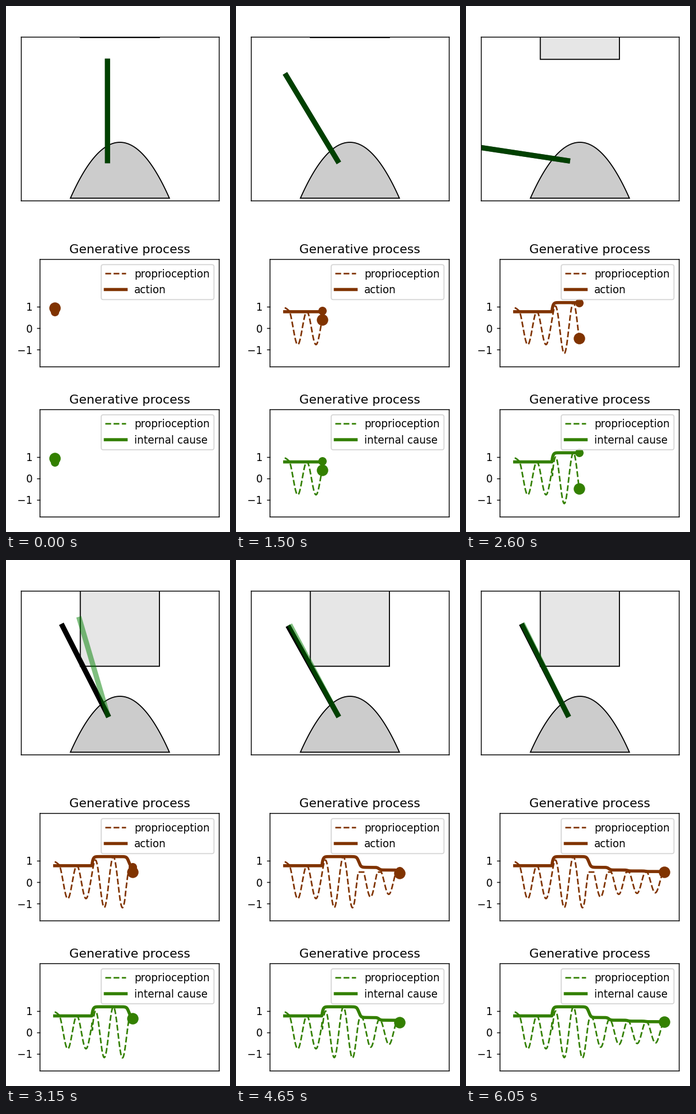
A matplotlib script for the animation above (6100 ms loop, 400x934 px).

```python
import matplotlib.pyplot as plt
import numpy as np
from matplotlib.animation import FuncAnimation
from matplotlib.patches import Polygon, Rectangle

W, H, DPI = 400, 934, 100
FRAMES, INTERVAL = 122, 50
SCALE = 4 / 3

plt.rcParams["font.family"] = "DejaVu Sans"
plt.rcParams["path.snap"] = False
for key in ("font.size", "axes.linewidth", "axes.titlepad", "ytick.major.size",
            "ytick.major.width", "ytick.major.pad", "lines.linewidth",
            "patch.linewidth"):
    plt.rcParams[key] *= SCALE

BROWN, GREEN = (0.5, 0.2, 0), (0.2, 0.5, 0)
START, PEAK, PERIOD = -0.3, 17.7, 14.81
REST = 0.3 * np.pi
CONTACT, LIMIT, LEAD = 57, 0.47, 0.17
PIVOT, ROD = np.array([181.3, 274.6]), 176.5
BOX_TOP, BOX_LOW = 56, 188.67

# (time, amount, width) of each loss of amplitude after touching the box
DROPS = [(59.9, 0.5, 0.85), (76.1, 0.125, 0.75), (91.4, 0.045, 0.7),
         (105.9, 0.025, 0.7), (119, 0.01, 0.7)]


def gain(t, start, tau):
    """Amplitude: one rise, then a smooth step down per contact."""
    g = 0.765 + 0.425 * (1 - np.exp(-np.maximum(t - start, 0) / tau))
    for when, amount, width in DROPS:
        g = g - amount / (1 + np.exp(-(t - when) / width))
    return g


def swing(t):
    phase = 2 * np.pi * np.maximum(t - PEAK + PERIOD, 0) / PERIOD
    settle = 0.177 * np.exp(-((t - START) / 3.2) ** 2)
    return gain(t, 29.55, 3.2) * np.cos(phase) + settle


def sensed(t):
    blocked = np.minimum(swing(t + LEAD), LIMIT)
    return np.where(t > CONTACT, blocked, swing(t))


def imagined(t):
    late = t - 30.2
    kink = np.where(late > 0, 0.38 * np.exp(-np.maximum(late, 0) / 1.15), 0)
    return swing(t) - kink


def drive(t):
    return gain(t, 29.9, 0.82)


def rod_points(value):
    tilt = REST - value
    tip = PIVOT - ROD * np.array([np.sin(tilt), np.cos(tilt)])
    return [PIVOT[0], tip[0]], [PIVOT[1], tip[1]]


fig = plt.figure(figsize=(W / DPI, H / DPI), dpi=DPI, facecolor="white")


def add_axes(left, top, right, bottom):
    return fig.add_axes([left / W, 1 - bottom / H,
                         (right - left) / W, (bottom - top) / H])


class Trace:
    """A plot of a dashed signal and its thick amplitude line."""

    def __init__(self, top, color, signal, label):
        self.signal = signal
        ax = add_axes(60.67, top, 380.67, top + 190.67)
        ax.set(xlim=(-12.24, 133.2), ylim=(-1.8, 3.2), xticks=[],
               yticks=[-1, 0, 1], title="Generative process")
        self.thin, = ax.plot([], [], "--", color=color, label="proprioception")
        self.thick, = ax.plot([], [], color=color, lw=3 * SCALE, label=label)
        self.big = ax.scatter([0], [0], s=100 * SCALE ** 2, color=[color])
        self.small = ax.scatter([0], [0], s=50 * SCALE ** 2, color=[color])
        ax.legend(loc="upper right")

    def update(self, ts):
        for line, dot, func in ((self.thin, self.big, self.signal),
                                (self.thick, self.small, drive)):
            ys = func(ts)
            line.set_data(ts, ys)
            dot.set_offsets([[ts[-1], ys[-1]]])


stage = add_axes(27.33, 55.33, 380.67, 346)
stage.set(xlim=(27.33, 380.67), ylim=(346, 55.33), xticks=[], yticks=[])

box = Rectangle((132.67, BOX_TOP - 200), 141.33, 200, fc="0.9", ec="black")
stage.add_patch(box)
u = np.linspace(-1, 1, 101)
dome = np.column_stack([203.4 + 88.4 * u, 242 + 99.3 * u ** 2])
stage.add_patch(Polygon(dome, closed=True, fc="0.8", ec="black"))

real_rod, = stage.plot([], [], color="black", lw=5 * SCALE)
mind_rod, = stage.plot([], [], color="green", alpha=0.5, lw=5 * SCALE)

traces = [Trace(450, BROWN, sensed, "action"),
          Trace(716.67, GREEN, imagined, "internal cause")]


def update(i):
    t = i if i else START
    ts = np.linspace(START, t, 1 + 8 * i)
    for trace in traces:
        trace.update(ts)
    real_rod.set_data(*rod_points(float(sensed(t))))
    mind_rod.set_data(*rod_points(float(imagined(t))))
    fall = np.clip((i - 48.5) / 12, 0, 1)
    box.set_y(BOX_TOP + (BOX_LOW - BOX_TOP) * fall - 200)
    return []


anim = FuncAnimation(fig, update, frames=FRAMES, interval=INTERVAL,
                     repeat=True, repeat_delay=0, blit=False)
plt.show()
```
